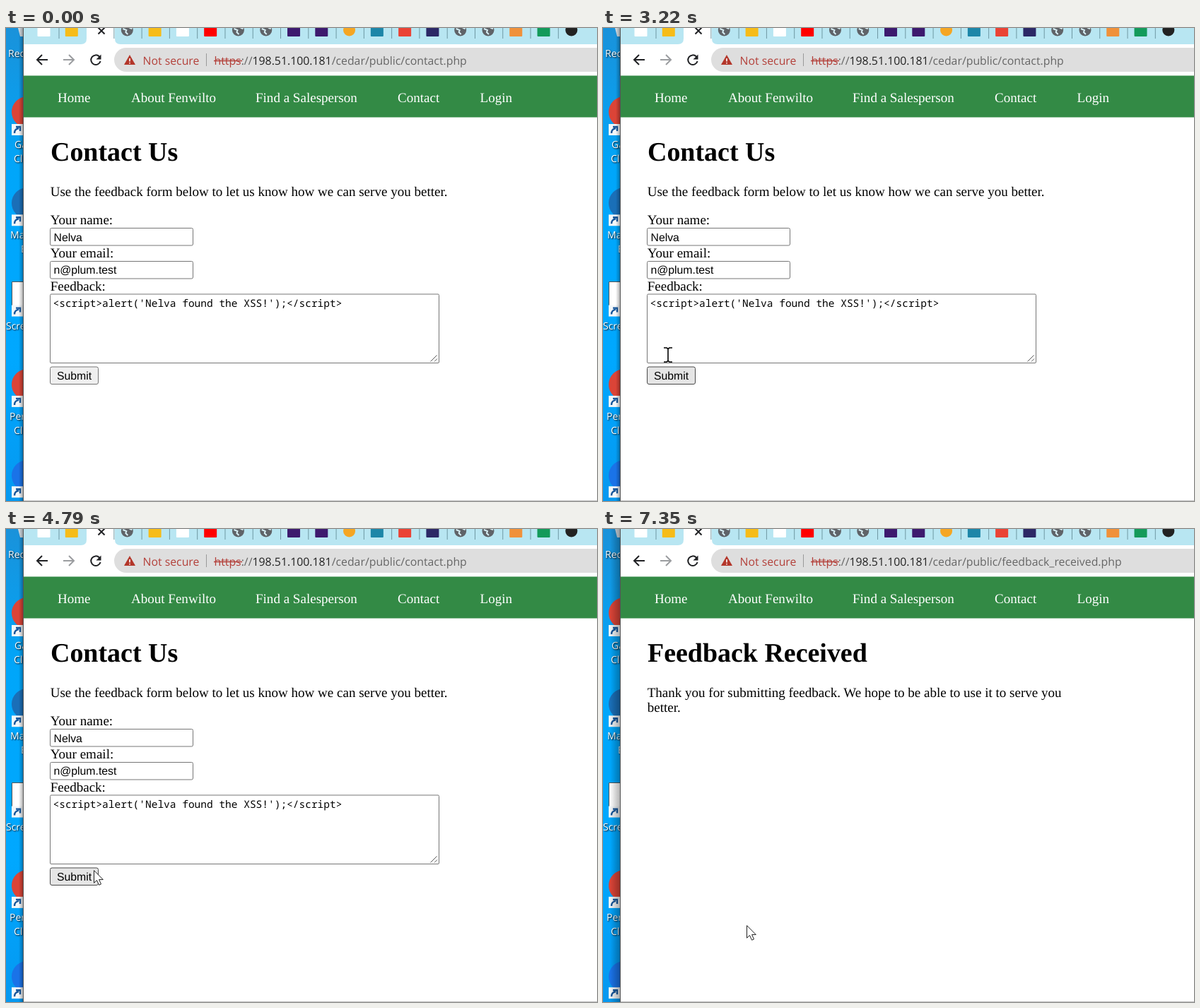
Write an HTML page that moves like this. It is 836 px wide and 670 px high and loops after 8000 ms.

```html
<!DOCTYPE html>
<html lang="en">
<head>
<meta charset="utf-8">
<title>Contact form</title>
<style>
  html, body { margin: 0; height: 100%; overflow: hidden; background: #fff; }
  svg { display: block; width: 836px; height: 670px; }
  text { white-space: pre; text-rendering: geometricPrecision; }
  .page { font: 19.05px "Liberation Serif", "Times New Roman", serif; }
  .title { font-size: 37.95px; font-weight: bold; }
  .field { font: 15.79px "Liberation Sans", Arial, sans-serif; }
  .code { font: 14.5px "Noto Sans Mono", monospace; }
  .bar { font: 15.84px "Open Sans", "Noto Sans", sans-serif; }
  .label { font: 14px "Open Sans", "Noto Sans", sans-serif; fill: #fff; text-shadow: 1px 1px 2px #000; }
  .box { fill: #fff; stroke: #767676; }
  .box.hover { stroke: #4a4a4a; }
  #button { fill: #efefef; }
  #button.hover { fill: #e5e5e5; }
  #button.active { fill: #f5f5f5; stroke: #8d8d8d; }
  .line { fill: none; stroke: #202124; stroke-width: 2; }
</style>
</head>
<body>
<svg viewBox="0 0 836 670">
  <defs>
    <linearGradient id="sky" x2="0" y2="1">
      <stop stop-color="#1a92da"/>
      <stop offset=".3" stop-color="#00a6fa"/>
      <stop offset=".7" stop-color="#00a8ff"/>
      <stop offset="1" stop-color="#0598f0"/>
    </linearGradient>
    <linearGradient id="shade">
      <stop stop-color="#000" stop-opacity="0"/>
      <stop offset="1" stop-color="#000" stop-opacity=".3"/>
    </linearGradient>
  </defs>

  <rect width="25" height="670" fill="url(#sky)"/>
  <g id="desktop"></g>
  <rect id="shadow" y="0" height="670" fill="url(#shade)"/>

  <!-- browser window -->
  <path fill="#fff" d="M24 0h812v670H24z"/>
  <path fill="#b8e6f2" d="M25 0H836V23H162Q154 23 154 15V0H114V15Q114 23 106 23H25z"/>
  <g id="tabs"></g>
  <path class="line" d="M130.5-.5l9 9M139.5-.5l-9 9" stroke-width="1.8"/>
  <path class="line" d="M59 45H44M51 38l-7 7 7 7"/>
  <path class="line" d="M81 45H96M89 38l7 7-7 7" style="stroke:#9b9da0"/>
  <g id="reload">
    <path class="line" d="M132 40.5A6.8 6.8 0 1 0 133.6 47"/>
    <path d="M134.5 37.5v7H127.5z" fill="#202124"/>
  </g>
  <path id="stop" class="line" d="M121 39l12 12M133 39l-12 12"/>
  <path fill="#dedede" d="M836 28H170a17 17 0 0 0 0 34H836z"/>
  <path fill="#b3362a" d="M175 38l8 14h-16z"/>
  <path stroke="#fff" stroke-width="1.6" d="M175 43v4.5M175 49v1.6"/>
  <path stroke="#9a9a9a" d="M283.5 36v18"/>
  <g class="bar">
    <text x="193.5" y="51.5" fill="#b3403a">Not secure</text>
    <text x="294.5" y="51.5" fill="#666"><tspan fill="#b3403a">https</tspan>://<tspan fill="#222">198.51.100.181</tspan><tspan id="path"></tspan></text>
    <path stroke="#b3403a" stroke-width="1.3" d="M294 46.5h40"/>
  </g>

  <path fill="#338a45" d="M25 67.5H836V126.5H25z"/>
  <g class="page" fill="#fff">
    <text x="73" y="105">Home</text>
    <text x="177" y="105">About Fenwilto</text>
    <text x="353" y="105">Find a Salesperson</text>
    <text x="554" y="105">Contact</text>
    <text x="670.5" y="105">Login</text>
  </g>

  <g id="form" class="page">
    <text class="title" x="63" y="188">Contact Us</text>
    <text x="62.7" y="238">Use the feedback form below to let us know how we can serve you better.</text>
    <text x="62.7" y="278">Your name:</text>
    <text x="62.7" y="325">Your email:</text>
    <text x="62.7" y="372">Feedback:</text>
    <rect class="box" x="62.5" y="283.5" width="202" height="24.5" rx="2"/>
    <rect class="box" x="62.5" y="330.5" width="202" height="24.5" rx="2"/>
    <rect class="box" id="area" x="62.5" y="377" width="550" height="97.5" rx="1.5"/>
    <path stroke="#555" d="M600.5 472.5l9-9M606 472.5l4-4"/>
    <rect class="box" id="button" x="62.5" y="480" width="68" height="24.5" rx="2.5"/>
    <g class="field">
      <text x="67.5" y="301.5">Nelva</text>
      <text x="67.5" y="348">n@plum.test</text>
      <text x="72" y="498">Submit</text>
    </g>
    <text class="code" x="66.5" y="395">&lt;script&gt;alert('Nelva found the XSS!');&lt;/script&gt;</text>
  </g>

  <g id="thanks" class="page">
    <text class="title" x="63" y="188">Feedback Received</text>
    <text x="62.7" y="238">Thank you for submitting feedback. We hope to be able to use it to serve you</text>
    <text x="62.7" y="259">better.</text>
  </g>

  <path stroke="#555" d="M24.5 0V670"/>
  <path stroke="#c4c4c4" d="M25 669.5H836"/>

  <circle id="click" cx="112" cy="483" r="14" fill="#f8e71c" opacity=".7"/>
  <path id="arrow" fill="#fff" stroke="#222" d="M.5.7V18.3l4-3.7 3 6.7 3-1.3-2.9-6.4h5.7z"/>
  <path id="beam" fill="none" stroke="#000" stroke-width="1.6" d="M-6-10h4l2 1.5 2-1.5h4M0-8.5v18M-6 10h4l2-1.5 2 1.5h4"/>
</svg>

<script>
const $ = id => document.getElementById(id);
const show = (id, on) => $(id).setAttribute('visibility', on ? 'visible' : 'hidden');

const disc = (x, y, r, fill) => `<circle cx="${x}" cy="${y}" r="${r}" fill="${fill}"/>`;
const square = (x, y, size, fill) =>
  `<rect x="${x - size / 2}" y="${y - size / 2}" width="${size}" height="${size}" rx="1" fill="${fill}"/>`;
const globe = x => disc(x, 3, 8.5, '#5f6368') +
  `<path d="M${x - 6} 1l5 2-1 3 3 3M${x + 1}-3l3 3 3 1" fill="none" stroke="#d7eff5" stroke-width="2"/>`;

// Tab icons: "o" + colour is a disc, "s" + colour a square, "g" a globe, "" the open tab.
const icons = ('s#fff s#f6bc18  g s#f6bc18 s#fff s#f00 g g s#3d1a6e s#3d1a6e o#f5a623 s#1d86a8 ' +
  's#ea4335 s#2c2866 g g s#f0913a s#139a5a o#222').split(' ');
$('tabs').innerHTML = icons.map((icon, i) => {
  const x = 53.5 + i * 39.28, colour = icon.slice(1);
  const draw = { o: () => disc(x, 3, 8.5, colour), s: () => square(x, 3, 18, colour), g: () => globe(x) }[icon[0]];
  const divider = i == 1 || i == 2 ? '' : `<path stroke="#6f98a3" d="M${x - 18.5} 0V15"/>`;
  return (i ? divider : '<path stroke="#6f98a3" d="M75 0V15"/>') + (draw ? draw() : '');
}).join('');

const labels = [['Rec', 3, 41], ['Ga', 12, 170], ['Cl', 11, 190], ['Mal', 6, 298], ['E', 21, 318],
  ['Scre', 0, 427], ['Per', 5, 555], ['Cl', 11, 575]];
$('desktop').innerHTML =
  '<path d="M17 0h8v12h-5z" fill="#d3dde4"/>' +
  disc(30, 119, 22, '#db4437') + disc(30, 248, 22, '#1a6fb8') +
  '<path d="M8.5 359.5H30v34H8.5z" fill="#fff" stroke="#555"/>' +
  disc(30, 505, 22, '#db4437') + disc(30, 634, 22, '#1a73e8') +
  [0, 1, 2, 3, 4].map(i => `<g transform="translate(8 ${136 + i * 128.3})">` +
    '<path d="M0 0h16v16H0z" fill="#f4f7f9"/>' +
    '<path d="M4 13q0-6 6-7M6 4h6v6" fill="none" stroke="#17579b" stroke-width="2.4"/></g>').join('') +
  labels.map(([word, x, y]) => `<text class="label" x="${x}" y="${y}">${word}</text>`).join('');

// Pointer moves: start, end, number of steps, then evenly timed points.
const moves = [
  [730, 850, 3, [446, 625], [260, 575], [199, 558]],
  [1180, 1400, 4, [190, 550], [150, 520], [105, 486], [97, 478]],
  [1600, 2010, 7, [97, 478], [95, 486], [92, 493], [92, 490]],
  [3220, 3970, 11, [92, 463], [112, 424], [205, 406], [300, 401], [393, 401], [425, 401]],
  [4040, 4790, 12, [415, 403], [330, 408], [230, 425], [150, 462], [112, 495], [124, 483]],
  [4860, 4920, 2, [118, 483], [114, 483]],
  [5060, 5130, 2, [113, 482], [112, 481]],
  [5390, 5460, 2, [112, 481], [112, 482]],
  [6330, 6670, 6, [114, 485], [132, 501], [165, 530], [190, 550], [200, 558], [203, 561]]
];

function pointer(t) {
  const move = moves.findLast(m => m[0] <= t);
  if (!move) return [-99, 999];
  const [start, end, steps, ...points] = move;
  const step = Math.min(steps - 1, Math.floor((t - start) / (end - start) * (steps - 1) + .01));
  const place = step / (steps - 1) * (points.length - 1);
  const i = Math.min(Math.floor(place + 1e-6), points.length - 2);
  return [0, 1].map(k => points[i][k] + (points[i + 1][k] - points[i][k]) * (place - i));
}

function draw(t) {
  const sent = t >= 7350, pressed = t >= 5730 && t < 5940, focused = t >= 5730;
  const loading = t >= 5940 && !sent;
  const [x, y] = pointer(t), inArea = y > 377 && y < 475;
  // Hover styles trail the pointer by one step.
  const [hx, hy] = pointer(t - 70);
  const onButton = hx > 62 && hx < 131 && hy > 479 && hy < 505;
  const onArea = hy > 377 && hy < 475;

  $('button').setAttribute('class', 'box' + (pressed ? ' active' : onButton ? ' hover' : ''));
  $('area').setAttribute('class', 'box' + (onArea ? ' hover' : ''));
  show('form', !sent);
  show('thanks', sent);
  show('reload', !loading);
  show('stop', loading);
  show('click', pressed);
  show('arrow', !inArea);
  show('beam', inArea);
  for (const id of ['arrow', 'beam']) $(id).setAttribute('transform', `translate(${x} ${y})`);
  $('shadow').setAttribute('x', focused ? 10 : 18);
  $('shadow').setAttribute('width', focused ? 14 : 6);
  $('path').textContent = '/cedar/public/' + (sent ? 'feedback_received' : 'contact') + '.php';
}

const began = performance.now();
function tick() {
  draw((performance.now() - began) % 8000);
  requestAnimationFrame(tick);
}
tick();
</script>
</body>
</html>
```
